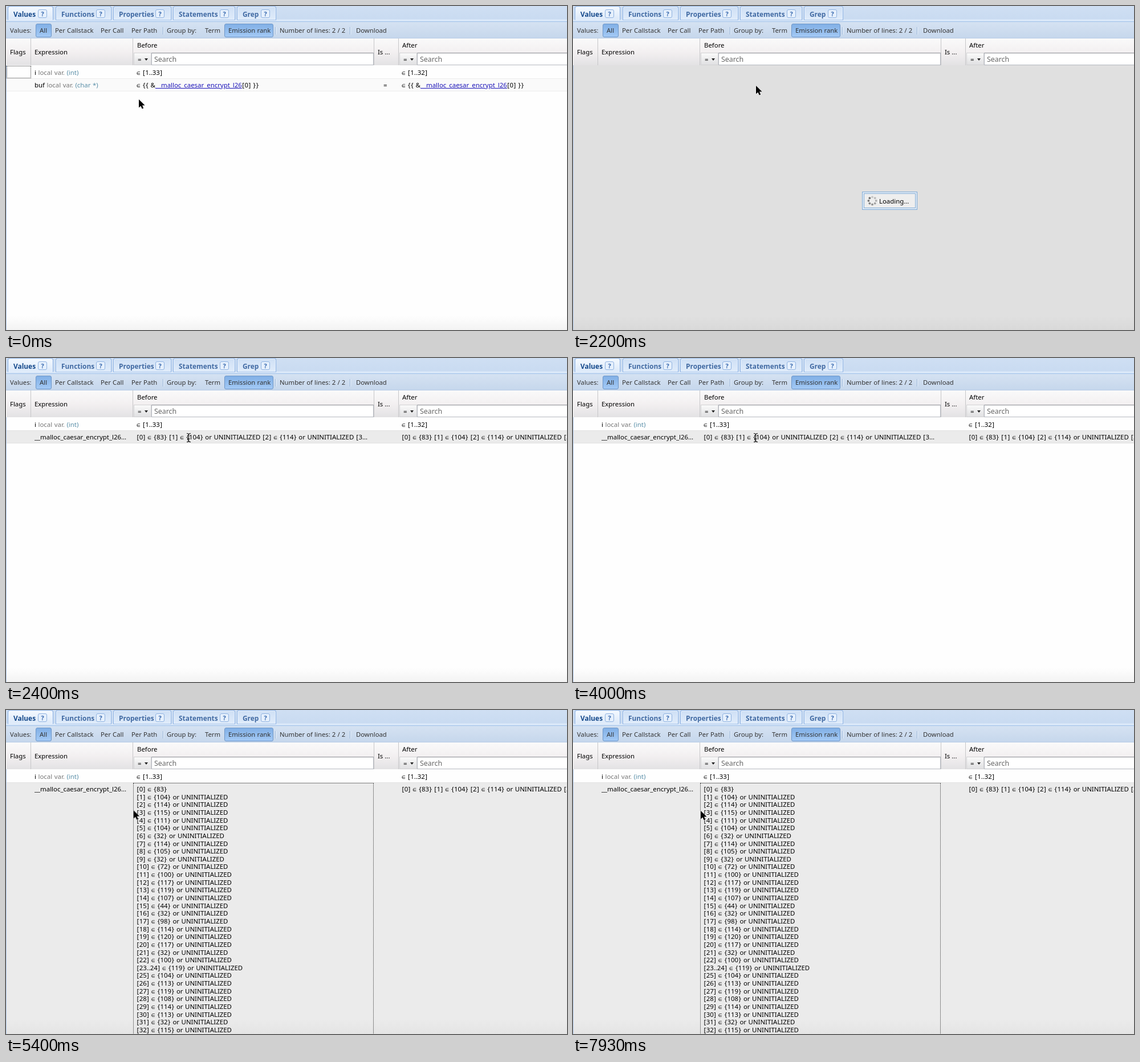
An HTML page that plays this animation: 984x569 px, repeating every 8000 ms.

```html
<!DOCTYPE html>
<html lang="en">
<head>
<meta charset="utf-8">
<title>Values table</title>
<style>
html, body { margin: 0; width: 100%; height: 100%; overflow: hidden; background: #fff; }
#stage { position: absolute; left: 0; top: 0; width: 984px; height: 569px; overflow: hidden;
  font: 11.4px/16px "Noto Sans", "Open Sans", sans-serif; color: #000; }
#stage div, #stage svg { position: absolute; box-sizing: border-box; }
.layer { inset: 0; }
.text { white-space: pre; margin-top: -8px; }
.bar { color: #333; font-size: 11.3px; word-spacing: .2px; }
.cell { word-spacing: .6px; }
.cell i { font-style: normal; padding: 0 .45px; }
.cell s { text-decoration: none; font: 8px/1 "DejaVu Sans", sans-serif; }
.cell u { color: #1a12b8; }
.cell em { font-style: normal; color: #777; }
.cell q { quotes: none; color: #5a8fa8; }
.search { font-size: 12.4px; color: #666; }

.tabs { left: 0; top: 0; width: 984px; height: 28px; background: linear-gradient(#cfdff3, #c9dbf1 23px, #dce9f9 24px, #d7e6f8 27px, #9fc0e8 27px); }
.tab { top: 0; height: 25px; border: 1px solid #8db2e3; border-bottom-color: #a6c4ea; border-radius: 4px 4px 0 0;
  background: linear-gradient(#cfe0f5, #dfebfa); box-shadow: inset 0 0 0 1px #e6f0fc; }
.tab.on { border-bottom-color: #dce9f9; background: linear-gradient(#f4f9ff, #dce9f9); }
.tabname { font-weight: bold; font-size: 11.9px; color: #416aa3; }
.tabname.on { color: #15498b; }
.help { top: 6px; width: 16px; height: 15px; border: 1px solid #8fb2e0; border-radius: 3px; background: #e6f0fc;
  font: bold 11px/13px "Noto Sans", sans-serif; color: #3567ae; text-align: center; }
.toolbar { left: 0; top: 28px; width: 984px; height: 29px; background: linear-gradient(#d5e2f2, #c6d7ec); border-bottom: 1px solid #b9cde6; }
.pressed { top: 31px; height: 24px; border: 1px solid #6d96c8; border-radius: 3px; background: linear-gradient(#82b0e6, #a3c9f5); }
.sep { top: 37px; width: 2px; height: 13px; background: linear-gradient(90deg, #98b4d6 50%, #eef5fd 50%); }
.head { left: 1px; top: 57px; width: 983px; height: 47px; background: linear-gradient(#fafafa, #f3f0f1 50%, #e3e2e4); }
.col { top: 57px; width: 1px; height: 47px; background: #c6c6c8; }
.op { top: 82px; width: 31px; height: 22px; background: linear-gradient(#fafafa, #e0e0e2); border: 1px solid #d2d2d4; }
.arrow { top: 92px; border: 3px solid transparent; border-top: 4px solid #222; }
.input { top: 82px; height: 22px; border: 1px solid #b5b8c0; border-top-color: #96989e; background: linear-gradient(#eee, #fff 3px); }

.body { left: 0; top: 104px; width: 984px; height: 465px; border-left: 1px solid #b4cbea; background: linear-gradient(#fefefe 440px, #f3f3f3); }
.row { left: 1px; top: 127px; width: 983px; height: 23px; border: solid #ededed; border-width: 1px 0; background: #fafafa; }
.row.over { background: #ebebeb; border-color: #e2e2e2; }
.row.tall { height: 450px; background: linear-gradient(#ebebeb 415px, #e3e3e3); }
.focus { border: 1px dotted #333; }
.mask { left: 1px; top: 104px; width: 983px; height: 465px; background: linear-gradient(#e0e0e0 440px, #d9d9d9); }
.box { left: 507px; top: 326px; width: 97px; height: 32px; border: 1px solid #7fabd8; background: #dfe9f4; }
.box div { inset: 2px; border: 1px solid #86aed6; background: #eee; }
.tip { left: 334px; top: 161px; width: 340px; height: 25px; border: 1px solid #8ba7c9; border-radius: 3px;
  background: #e7f0fc; box-shadow: 1px 2px 4px #0006; }
.tiptext { font-size: 11.2px; color: #444; }
.tiptext b { font-size: 12px; letter-spacing: .4px; color: #333; }

#stage .start, #stage .hover, #stage .hint, #stage .load, #stage .short, #stage .long, #cursor svg
  { animation: 8s step-end infinite; }
#stage .start { animation-name: start; }
#stage .hover { animation-name: hover; }
#stage .hint { animation-name: hint; }
#stage .load { animation-name: load; }
#stage .short, #cursor .beam { animation-name: short; }
#stage .long { animation-name: long; }
#cursor .point { animation-name: point; }
#cursor .hand { animation-name: hand; }
@keyframes start { 0% { visibility: visible } 29.9%, to { visibility: hidden } }
@keyframes hover { 0% { visibility: hidden } 3.2% { visibility: visible } 24.9%, to { visibility: hidden } }
@keyframes hint { 0% { visibility: hidden } 10.7% { visibility: visible } 24.9%, to { visibility: hidden } }
@keyframes load { 0% { visibility: hidden } 24.9% { visibility: visible } 29.9%, to { visibility: hidden } }
@keyframes short { 0% { visibility: hidden } 29.9% { visibility: visible } 54.1%, to { visibility: hidden } }
@keyframes long { 0% { visibility: hidden } 54.1%, to { visibility: visible } }
@keyframes hand { 0% { visibility: hidden } 4.1% { visibility: visible } 24.9%, to { visibility: hidden } }
@keyframes point {
  0% { visibility: visible } 4.1% { visibility: hidden }
  24.9% { visibility: visible } 29.9% { visibility: hidden }
  54.1%, to { visibility: visible }
}
#cursor { left: 0; top: 0; animation: move 8s linear infinite; }
#cursor svg { left: -10px; top: -12px; overflow: visible; }
@keyframes move {
  0% { transform: translate(233px, 164px); animation-timing-function: ease-in-out }
  6.6%, 24.8% { transform: translate(319px, 142px) }
  24.9%, 29.8% { transform: translate(321px, 140px) }
  29.9%, 54% { transform: translate(320px, 140px) }
  54.1%, 55% { transform: translate(316px, 140px); animation-timing-function: ease-in-out }
  64% { transform: translate(224px, 142px) }
  80.75% { transform: translate(222px, 305px); animation-timing-function: ease-out }
  85.75%, 87% { transform: translate(222px, 380px); animation-timing-function: ease-in }
  97.5% { transform: translate(222px, 212px) }
  99.1%, to { transform: translate(224px, 177px) }
}
#spin { transform-origin: 0 0; animation: spin .8s steps(8) infinite; }
@keyframes spin { to { transform: rotate(360deg) } }
</style>
</head>
<body>
<div id="stage"></div>
<script>
const box = (cls, x, w, html = "") =>
  `<div class="${cls}" style="left:${x}px;${w ? `width:${w}px` : ""}">${html}</div>`;
const text = (x, y, html, cls = "") =>
  `<div class="text ${cls}" style="left:${x}px;top:${y}px">${html}</div>`;
const layer = (cls, ...parts) => `<div class="layer ${cls}">${parts.join("")}</div>`;
const plain = cls => `<div class="${cls}"></div>`;

// Table cells get slightly roomier brackets and a small membership sign.
const cell = (x, y, html) =>
  text(x, y, html.replace(/[\[\]{}]/g, "<i>$&</i>").replace(/∈/g, "<s>∈</s>"), "cell");

const tab = ([name, x, w, textX, helpX], i) => {
  const on = i ? "" : " on";
  return box("tab" + on, x, w) + text(textX, 13.5, name, "tabname" + on) + box("help", helpX, 0, "?");
};
const tabs = [
  ["Values", 3, 80, 13, 56], ["Functions", 87, 98, 97, 158], ["Properties", 188, 102, 198, 262],
  ["Statements", 293, 109, 303, 375], ["Grep", 405, 69, 415, 447]
];
const tools = [
  [7, "Values:"], [59, "All"], [86, "Per Callstack"], [166, "Per Call"], [220, "Per Path"], [282, "Group by:"],
  [349, "Term"], [390, "Emission rank"], [480, "Number of lines: 2 / 2"], [614, "Download"]
];
const filter = (x, w) =>
  box("op", x, 31) + text(x + 7, 93.5, "=") + box("arrow", x + 19) +
  box("input", x + 31, w) + text(x + 36, 93.5, "Search", "search");

const chrome = layer("",
  plain("tabs"), tabs.map(tab).join(""),
  plain("toolbar"), box("pressed", 52, 28), box("pressed", 383, 86),
  [275, 472, 603].map(x => box("sep", x)).join(""),
  tools.map(([x, s]) => text(x, 43, s, "bar")).join(""),
  plain("head"), [43, 222, 645, 688].map(x => box("col", x)).join(""),
  text(7, 80.5, "Flags"), text(50, 80.5, "Expression"), text(230, 69, "Before"),
  text(652, 80.5, "Is ..."), text(695, 69, "After"),
  filter(224, 390), filter(690, 300));

const name = "__malloc_caesar_encrypt_l26";
const pointer = `∈ {{ &amp;<u>${name}</u>[0] }}`;
const after = cell(694, 139, "[0] ∈ {83} [1] ∈ {104} [2] ∈ {114} or UNINITIALIZED [3] ∈ {115}");
const term = cell(50, 139, name + "...");

const bytes = [83, 104, 114, 115, 111, 104, 32, 114, 105, 32, 72, 100, 117, 119, 107, 44, 32, 98, 114, 120, 117,
  32, 100, 119, 104, 113, 119, 108, 114, 113, 32, 115];
const byteRow = (value, i) => {
  const index = i < 23 ? i : i === 23 ? "23..24" : i + 1;
  return cell(229, 139 + i * 13.645, `[${index}] ∈ {${value}}${i ? " or UNINITIALIZED" : ""}`);
};

const firstRow = cell(50, 117, "i <em>local var.</em> <q>(int)</q>") +
  cell(229, 117, "∈ [1..33]") + cell(694, 117, "∈ [1..32]");

const dots = Array.from({ length: 8 }, (_, i) =>
  `<circle cx="6.6" r="1.9" fill="hsl(0 0% ${78 - i * 5}%)" transform="rotate(${i * 45})"/>`).join("");

const cursor = (cls, shape) =>
  `<svg class="${cls}" width="30" height="36" viewBox="-10 -12 30 36">${shape}</svg>`;

document.getElementById("stage").innerHTML = [
  plain("body"), chrome,
  layer("start", plain("row")),
  layer("hover", plain("row over")),
  firstRow,
  layer("start",
    '<div class="focus" style="left:1px;top:105px;width:43px;height:22px"></div>',
    cell(50, 139, "buf <em>local var.</em> <q>(char *)</q>"),
    cell(229, 139, pointer), cell(662, 139, "="), cell(694, 139, pointer)),
  layer("hint", plain("tip"), text(340, 174, `Replace the current term by <b>${name}</b>`, "tiptext")),
  layer("short", plain("row over"), term, after,
    cell(229, 139, "[0] ∈ {83} [1] ∈ {104} or UNINITIALIZED [2] ∈ {114} or UNINITIALIZED [3...")),
  layer("long", plain("row over tall"), term, after,
    '<div class="focus" style="left:223px;top:128px;width:422px;height:450px"></div>',
    bytes.map(byteRow).join("")),
  layer("load", plain("mask"), '<div class="box"><div></div></div>',
    `<svg style="left:515px;top:332px" width="20" height="20" viewBox="-10 -10 20 20"><g id="spin">${dots}</g></svg>`,
    text(537, 342.5, "Loading...")),
  '<div id="cursor">',
  cursor("point", '<path d="M0 0V14.5L3.4 11.4 5.7 16.6 8.2 15.5 6 10.4H10.6Z" fill="#000" stroke="#fff" stroke-width="1" paint-order="stroke"/>'),
  cursor("hand", '<path d="M-2.5 1Q-2.5-.7-1-.7T.6 1V6L1 4.8Q3 4 3.5 5.6 5.2 4.8 5.8 6.4 8 6 8 8.5V11L6.6 14V16.3H-1.2V14.5L-4.8 9.7Q-5.2 8-3.6 8L-2.3 9.4Z" fill="#fff" stroke="#000" stroke-width="1.1"/><path d="M1.2 11V14M3 11V14M4.8 11V14" stroke="#000" stroke-width=".8"/>'),
  cursor("beam", '<path d="M-3-7.5Q0-7.5 .5-6 1-7.5 4-7.5M.5-6V6M-3 7.5Q0 7.5 .5 6 1 7.5 4 7.5M-1.5 2H2.5" fill="none" stroke="#000" stroke-width="1.1"/>'),
  "</div>"
].join("");
</script>
</body>
</html>
```
